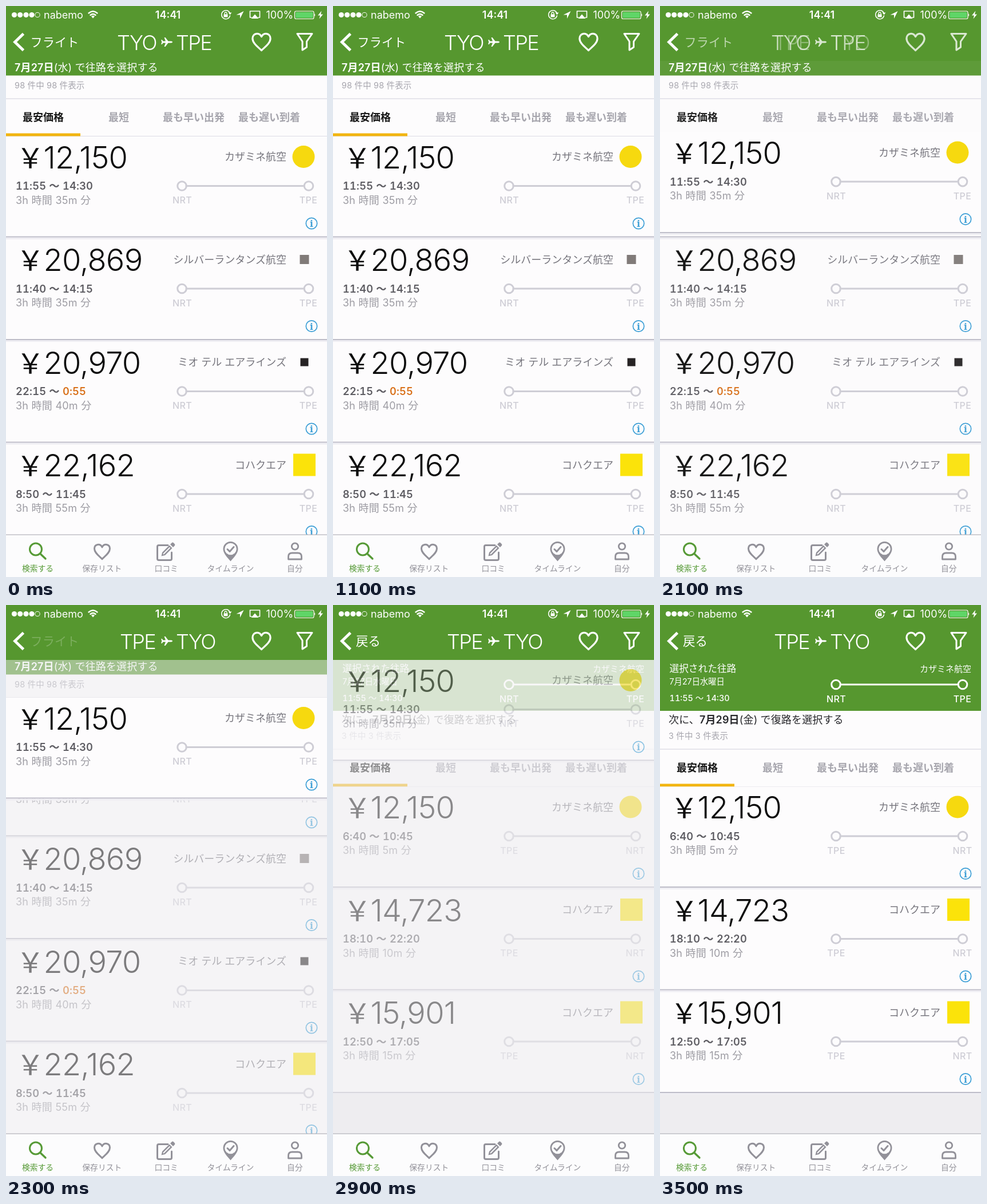
An HTML page for the animation above (3.6 s loop, 561 by 998 pixels).

```html
<!DOCTYPE html>
<html lang="ja">
<head>
<meta charset="utf-8">
<title>Flight results</title>
<style>
  html, body { margin: 0; width: 100%; height: 100%; overflow: hidden; background: #eeedf0; }
  svg { display: block; width: 561px; height: 998px; }
  text { font-family: Inter, "Noto Sans CJK JP", "Noto Sans CJK", sans-serif; white-space: pre; }
  .serif { font-family: "Noto Serif", "Liberation Serif", serif; }
  .times { font-variant-numeric: tabular-nums; }
  .line { fill: none; stroke-linecap: round; stroke-linejoin: round; }
</style>
</head>
<body>
<svg id="stage" viewBox="0 0 561 998" xmlns="http://www.w3.org/2000/svg"></svg>
<script>
const GREEN = '#56972f', PAPER = '#fdfcfd', GREY = '#a6a5ad', RULE = '#dddce6', ROUTE = '#cecdd5';
const CARD_TOP = 228, PITCH = 179.5;

const text = (x, y, size, str, fill, weight = 400, anchor = 'start', spacing = 0) =>
  `<text x="${x}" y="${y}" font-size="${size}" fill="${fill}" font-weight="${weight}" text-anchor="${anchor}" letter-spacing="${spacing}">${str}</text>`;
const rect = (x, y, w, h, fill) => `<rect x="${x}" y="${y}" width="${w}" height="${h}" fill="${fill}"/>`;
const dot = (x, y, r, fill) => `<circle cx="${x}" cy="${y}" r="${r}" fill="${fill}"/>`;
const ring = (x, y, r, stroke, w) => `<circle cx="${x}" cy="${y}" r="${r}" fill="none" stroke="${stroke}" stroke-width="${w}"/>`;
const line = (d, stroke, w) => `<path class="line" d="${d}" stroke="${stroke}" stroke-width="${w}"/>`;
const shape = (d, fill) => `<path d="${d}" fill="${fill}"/>`;
const group = (id, body) => `<g id="${id}">${body}</g>`;
const shift = (x, y, body) => `<g transform="translate(${x} ${y})">${body}</g>`;
const bold = s => `<tspan font-weight="600">${s}</tspan>`;
const times = body => `<g class="times">${body}</g>`;

const heart = (x, y, k, color, w) =>
  `<g transform="translate(${x} ${y}) scale(${k})">${line('M0 14C-6 8-15 2-15-6C-15-15-4-17 0-9C4-17 15-15 15-6C15 2 6 8 0 14Z', color, w / k)}</g>`;

// Airline name and the plain mark beside it
const yellowDot = dot(520, 35.5, 19.5, '#f6d90f');
const square = (size, fill) => rect(521.5 - size / 2, 35.5 - size / 2, size, size, fill);
const AIR = {
  kaza: ['カザミネ航空', yellowDot],
  lantern: ['シルバーランタンズ航空', square(16, '#817b79')],
  mio: ['ミオ テル エアラインズ', square(14, '#262324')],
  amber: ['コハクエア', square(39, '#fbe30a')]
};

const route = (y, from, to, color, labelY) =>
  line(`M315 ${y}H521`, color, 3) + ring(307.5, y, 7.8, color, 3) + ring(529, y, 7.8, color, 3) +
  text(308, labelY, 16, from, color, 500, 'middle', .3) + text(528.5, labelY, 16, to, color, 500, 'middle', .3);

function card([price, air, start, end, span, late], from, to) {
  const [name, mark] = AIR[air];
  const arrive = late ? `<tspan fill="#d9721c">${end}</tspan>` : end;
  return rect(0, 0, 561, 175, PAPER) + rect(0, 174.5, 561, 2, '#bdbcc8') + rect(0, 176.5, 561, 3, '#efeef3') +
    text(42.5, 54.5, 48, '\uFFE5', '#0c0c0c', 300, 'middle') +
    text(65.5, 55.5, 54, price, '#0c0c0c', 300, 'start', -.7) +
    text(490, 42, 18, name, '#75747c', 400, 'end') + mark +
    times(text(17, 93, 18.3, `${start} 〜 ${arrive}`, '#5d5c62', 600, 'start', .2)) +
    text(17, 117.5, 18, span, '#9d9ca3', 400, 'start', .25) +
    route(86.5, from, to, ROUTE, 117) +
    ring(534, 152, 9.7, '#3d9fd6', 1.7) +
    `<text class="serif" x="534" y="158" font-size="17" font-weight="700" fill="#3d9fd6" text-anchor="middle">i</text>`;
}

const cards = (list, top, from, to) => list.map((c, i) => shift(0, top + i * PITCH, card(c, from, to))).join('');

const tabs = y => shift(0, y,
  rect(0, 0, 561, 66, PAPER) + rect(0, -.7, 561, 1.4, RULE) + rect(0, 65, 561, 1.2, RULE) +
  [['最安価格', 65, '#161616'], ['最短', 197, GREY], ['最も早い出発', 328, GREY], ['最も遅い到着', 460, GREY]]
    .map(([s, x, c]) => text(x, 39, 18, s, c, 700, 'middle')).join('') +
  rect(0, 60.5, 130, 5, '#f2b510'));

const outbound = [
  ['12,150', 'kaza', '11:55', '14:30', '3h 時間 35m 分'],
  ['20,869', 'lantern', '11:40', '14:15', '3h 時間 35m 分'],
  ['20,970', 'mio', '22:15', '0:55', '3h 時間 40m 分', true],
  ['22,162', 'amber', '8:50', '11:45', '3h 時間 55m 分']
];
const inbound = [
  ['12,150', 'kaza', '6:40', '10:45', '3h 時間 5m 分'],
  ['14,723', 'amber', '18:10', '22:20', '3h 時間 10m 分'],
  ['15,901', 'amber', '12:50', '17:05', '3h 時間 15m 分']
];

const firstPage = rect(0, 96, 561, 26, GREEN) +
  text(15, 113.5, 18, bold('7月27日') + '(水) で往路を選択する', '#fff', 400, 'start', .15) +
  rect(0, 121.5, 561, 40.5, PAPER) + text(15, 144, 14.5, '98 件中 98 件表示', GREY, 400, 'start', .15) +
  tabs(162) + cards(outbound, CARD_TOP, 'NRT', 'TPE');

const secondPage = rect(0, 96, 561, 89, GREEN) +
  text(16.5, 117, 16.7, '選択された往路', '#fff') +
  text(16.5, 139, 14.3, '7月27日水曜日', '#fff') +
  times(text(16.5, 168, 14.5, '11:55 〜 14:30', '#fff', 500)) +
  text(544, 117, 15, AIR.kaza[0], '#fff', 400, 'end') +
  route(139, 'NRT', 'TPE', '#fff', 169.5) +
  rect(0, 185, 561, 67, PAPER) +
  text(15, 206.5, 18, `次に、${bold('7月29日')}(金) で復路を選択する`, '#26262a', 400, 'start', .15) +
  text(15, 234, 14.5, '3 件中 3 件表示', GREY, 400, 'start', .15) +
  tabs(252) + cards(inbound, 317.5, 'TPE', 'NRT');

const plane = shift(281, 63, shape('M10 0C10-1.200 8-1.500 6-1.500H2.500L-2.500-8H-4.500L-2-1.500H-6.500L-8.200-4H-9.800L-8.700 0L-9.800 4H-8.200L-6.500 1.500H-2L-4.500 8H-2.500L2.500 1.500H6C8 1.500 10 1.200 10 0Z', '#fff'));
const title = (a, ax, b, bx) =>
  text(ax, 76.5, 36, a, '#fff', 300, 'start', -1.6) + plane + text(bx, 76.5, 36, b, '#fff', 300, 'start', -1.6) +
  heart(446.5, 63, 1.04, '#fff', 3.2) + line('M509 48.5H535L525.5 62V72L518 77V62Z', '#fff', 3);

const statusBar =
  [14.5, 24.7, 35, 45].map(x => dot(x, 15.5, 4.6, '#fff')).join('') + ring(55, 15.5, 4.1, '#fff', 1) +
  text(66, 22, 18, 'nabemo', '#fff', 400) +
  line('M144.500 12.500Q152 6 159.500 12.500M147.500 16Q152 12 156.500 16', '#fff', 2.4) + shape('M149 18Q152 15.500 155 18L152 21.500Z', '#fff') +
  text(283, 22, 18, '14:41', '#fff', 600, 'middle') +
  line('M391 12A7.500 7.500 0 1 0 391.500 17', '#fff', 1.5) + shape('M388.500 11.500H394.500L391.500 15.500Z', '#fff') +
  rect(380.5, 14.5, 7, 5, '#fff') + line('M382 14.500V13A2 2 0 0 1 386 13V14.500', '#fff', 1.3) +
  shape('M415.500 9L402.500 15.500H409V22Z', '#fff') +
  line('M429 20H426.500V9H443.500V20H441', '#fff', 1.7) + shape('M435 14.500L441.500 22H428.500Z', '#fff') +
  text(454.5, 22, 18, '100%', '#fff', 400) +
  '<rect x="504.500" y="9" width="33.500" height="13.500" rx="2.500" fill="none" stroke="#fff" stroke-width="1.200"/>' +
  rect(506.3, 10.8, 30, 10, '#5fd567') + shape('M539 13Q541.500 15.700 539 18.500Z', '#fff') +
  shape('M551.500 8.500L545 16.500H549L547.500 22.500L554 14.500H550Z', '#fff');

const nav = rect(0, 0, 561, 96, GREEN) + statusBar +
  '<path d="M30.500 48.500L15.500 63L30.500 77.500" fill="none" stroke="#fff" stroke-width="4.800"/>' +
  group('backOld', text(42.5, 71, 21.2, 'フライト', '#fff')) +
  group('backNew', text(40, 71, 21.5, '戻る', '#fff')) +
  group('titleOld', title('TYO', 194, 'TPE', 297)) +
  group('titleNew', title('TPE', 199, 'TYO', 297));

const ICON = '#929199', ACTIVE = '#569a36';
const tabBar = rect(0, 924, 561, 74, '#fcfcfd') + rect(0, 923.5, 561, 1.3, '#b9b8bf') +
  ring(52, 949.5, 10.5, ACTIVE, 3) + line('M60 957.500L69 966', ACTIVE, 3.4) +
  heart(168, 954, .9, ICON, 3) +
  line('M283 942.500H267Q264.500 942.500 264.500 945V966Q264.500 968.500 267 968.500H287Q289.500 968.500 289.500 966V955', ICON, 3) +
  shape('M273 955L285.500 942.500L290.500 947.500L278 960L271.500 961.500ZM287 941L290 938Q291.500 937 293 938.500L294.500 940Q296 941.500 295 943L292 946Z', ICON) +
  line('M275.500 957.500L286 947', '#fcfcfd', 1.8) +
  shape('M392.500 970.500C387 964 379.500 957 379.500 949A13 13 0 0 1 405.500 949C405.500 957 398 964 392.500 970.500Z', ICON) +
  dot(392.5, 949, 10.3, '#fcfcfd') + line('M387 949.500L391 953.500L398 945.500', ICON, 3) +
  ring(505, 944.5, 5.7, ICON, 2.8) +
  line('M493.500 967V962.500Q493.500 956 500 956H510Q516.500 956 516.500 962.500V967Z', ICON, 2.8) +
  ['検索する', '保存リスト', '口コミ', 'タイムライン', '自分']
    .map((s, i) => text(55.5 + i * 112.3, 987.5, 13.8, s, i ? ICON : ACTIVE, 400, 'middle')).join('');

const stage = document.getElementById('stage');
stage.innerHTML = rect(0, 0, 561, 998, '#eeedf0') +
  group('first', firstPage) + group('second', secondPage) +
  group('picked', card(outbound[0], 'NRT', 'TPE')) + nav + tabBar;

const part = id => document.getElementById(id);
const fade = (id, v) => part(id).setAttribute('opacity', v.toFixed(3));
const ramp = (t, from, span) => Math.min(1, Math.max(0, (t - from) / span));

// Same curve as the CSS ease-in-out keyword, solved by bisection
function ease(x) {
  let lo = 0, hi = 1;
  const at = (u, a, b) => 3 * a * u * (1 - u) ** 2 + 3 * b * u * u * (1 - u) + u ** 3;
  for (let i = 0; i < 24; i++) {
    const mid = (lo + hi) / 2;
    if (at(mid, .42, .58) < x) lo = mid; else hi = mid;
  }
  return at(lo, 0, 1);
}

function draw(t) {
  const lift = ease(ramp(t, 2000, 600));
  const swap = ease(ramp(t, 2620, 600));
  const cross = ramp(t, 2000, 300);
  fade('first', 1 - lift);
  fade('second', swap);
  fade('picked', 1 - swap);
  part('picked').setAttribute('transform', `translate(0 ${CARD_TOP - 132 * lift})`);
  fade('titleOld', 1 - cross);
  fade('titleNew', cross);
  fade('backOld', t < 2000 ? 1 : t < 2800 ? Math.exp((2000 - t) / 200) : 0);
  fade('backNew', ramp(t, 2300, 250));
}

// The picture advances ten times a second
const began = performance.now();
function tick() {
  const t = (performance.now() - began) % 3600;
  draw(Math.floor(t / 100) * 100);
  requestAnimationFrame(tick);
}
tick();
</script>
</body>
</html>
```
